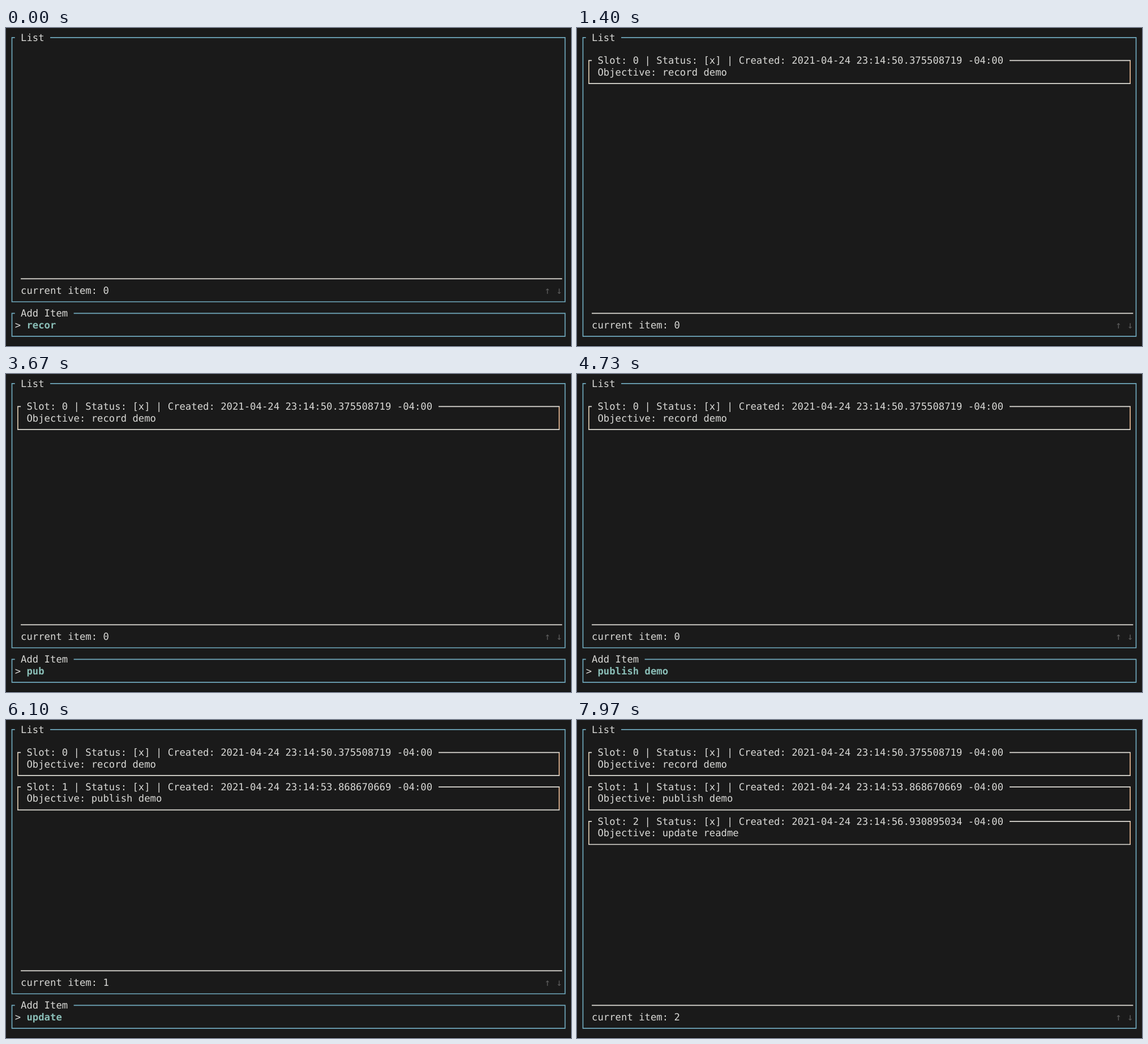
Animation, 998 px wide and 561 px high, one loop 8000 ms. Source, as an HTML page:

```html
<!DOCTYPE html>
<html lang="en">
<head>
<meta charset="utf-8">
<title>Task list</title>
<style>
  html, body { margin: 0; width: 100%; height: 100%; overflow: hidden; background: #1a1a1a; }
  svg { display: block; width: 100vw; height: 100vh; }
  text {
    font: 17.265px "DejaVu Sans Mono", monospace;
    text-rendering: geometricPrecision;
    white-space: pre;
    fill: #d9d9d6;
  }
  path { fill: none; stroke: #dedcd5; stroke-width: 1.7; }
  .frame { stroke: #70a9bd; }
  .left { stroke: #dccbb0; }
  .right { stroke: #e8b994; }
  .dim { fill: #5c5c5c; }
  .input { font-weight: bold; fill: #8abeb7; }
  .edge { stroke: #0c0c0c; stroke-width: 1; }
</style>
</head>
<body>
<svg id="screen" viewBox="0 0 998 561"></svg>
<script>
const LOOP = 8000;
const CELL = 10.394;
const ROW = 20.27;
const colX = c => +(5.3 + c * CELL).toFixed(2);
const midX = c => colX(c + 0.5);
const rowY = r => +(16.8 + r * ROW).toFixed(2);

// keys: time at which each character of the objective appears
const tasks = [
  { text: "record demo", open: 0, added: 1330, created: "50.375508719",
    keys: [0, 0, 0, 0, 0, 30, 400, 670, 800, 930, 1070] },
  { text: "publish demo", open: 2770, added: 4830, created: "53.868670669",
    keys: [3400, 3530, 3600, 3700, 3800, 3900, 4000, 4100, 4200, 4300, 4400, 4500] },
  { text: "update readme", open: 5270, added: 7870, created: "56.930895034",
    keys: [5570, 5670, 5770, 5870, 5970, 6070, 6250, 6430, 6530, 6600, 6700, 6970, 7230] }
];

const text = (col, row, str, cls = "") =>
  `<text class="${cls}" x="${colX(col)}" y="${rowY(row) + 6}">${str}</text>`;
const path = (d, cls = "") => `<path class="${cls}" d="${d}"/>`;

function panel(title, top, bottom) {
  const x1 = midX(0), x2 = midX(94), y1 = rowY(top), y2 = rowY(bottom);
  return path(`M${colX(1)} ${y1}H${x1}V${y2}H${x2}V${y1}H${colX(title.length + 3)}`, "frame")
    + text(2, top, title);
}

function card(task, slot) {
  const top = 2 + slot * 3;
  const title = `Slot: ${slot} | Status: [x] | Created: 2021-04-24 23:14:${task.created} -04:00`;
  const x1 = midX(1), x2 = midX(93), y1 = rowY(top), y2 = rowY(top + 2);
  return path(`M${x1} ${y1}V${y2}`, "left")
    + path(`M${x2} ${y1}V${y2}`, "right")
    + path(`M${x1 - 0.8} ${y1}H${colX(2)}M${colX(title.length + 4)} ${y1}H${x2 + 0.8}`)
    + path(`M${x1 - 0.8} ${y2}H${x2 + 0.8}`)
    + text(3, top, title)
    + text(3, top + 1, "Objective: " + task.text);
}

function view(t) {
  const done = tasks.filter(task => t >= task.added);
  const editing = tasks.find(task => t >= task.open && t < task.added);
  const bottom = editing ? 23 : 26;
  let out = panel("List", 0, bottom)
    + done.map(card).join("")
    + path(`M${colX(2)} ${rowY(bottom - 2)}H${colX(94)}`)
    + text(2, bottom - 1, `current item: ${Math.max(0, done.length - 1)}`)
    + text(91, bottom - 1, "↑", "dim")
    + text(93, bottom - 1, "↓", "dim")
    + path("M0 560.5H998", "edge");
  if (editing) {
    const typed = editing.keys.filter(key => t >= key).length;
    out += panel("Add Item", 24, 26)
      + text(1, 25, "&gt;")
      + text(3, 25, editing.text.slice(0, typed), "input");
  }
  return out;
}

const screenEl = document.getElementById("screen");
let shown = "";
function draw() {
  const next = view(performance.now() % LOOP);
  if (next !== shown) screenEl.innerHTML = shown = next;
  requestAnimationFrame(draw);
}
draw();
</script>
</body>
</html>
```
